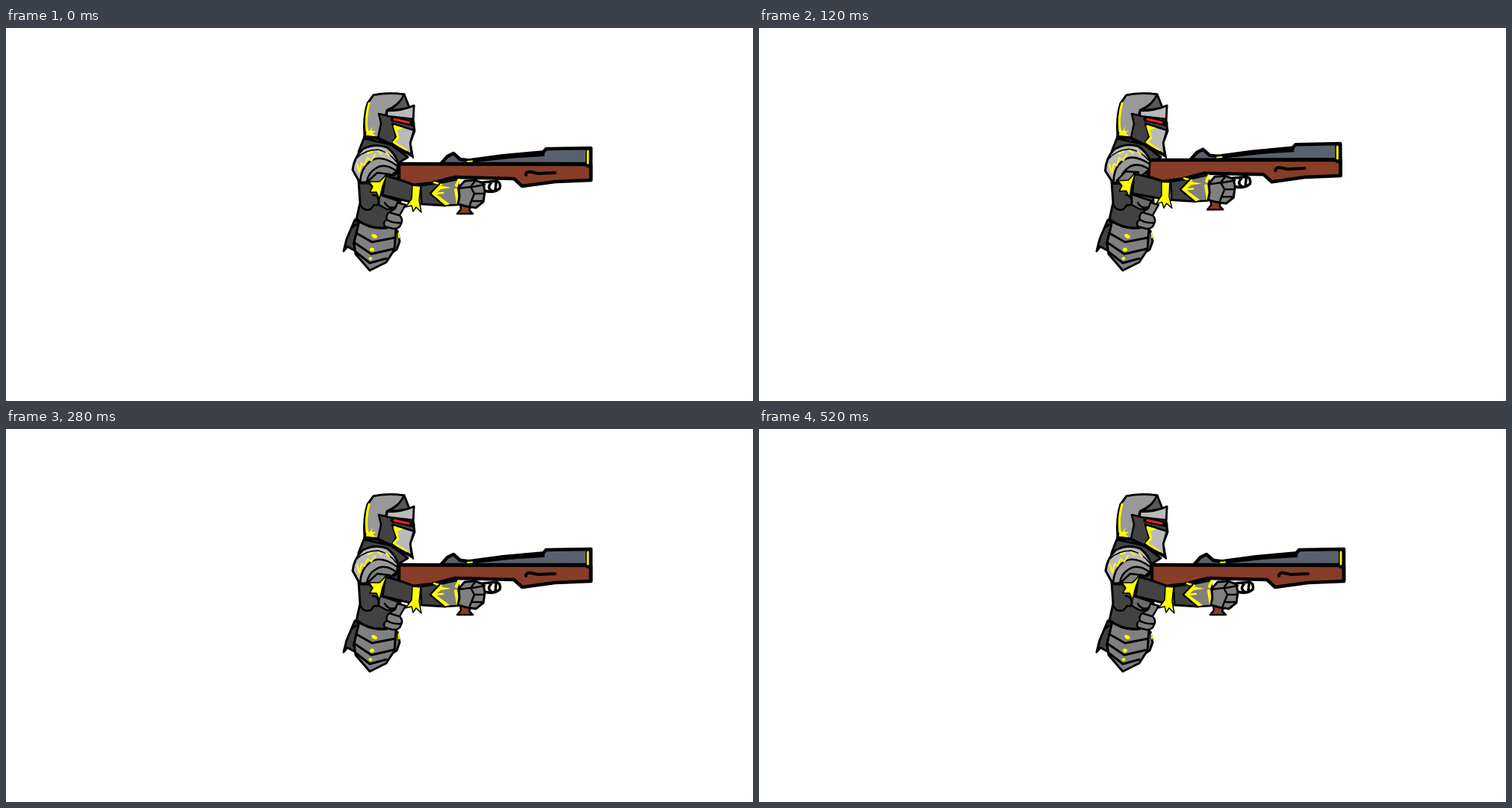
Recreate the animation shown at these times as an HTML page with a canvas. Size 1000 by 500 pixels, loop 1.04 s.

```html
<!DOCTYPE html>
<html lang="en">
<head>
<meta charset="utf-8">
<title>Knight with rifle</title>
<style>
html, body { margin: 0; width: 100%; height: 100%; overflow: hidden; background: #fff; }
canvas { display: block; }
</style>
</head>
<body>
<canvas id="stage" width="1000" height="500"></canvas>
<script>
const ctx = document.getElementById('stage').getContext('2d');
const LOOP = 1040, STEP = 40;
const DARK = '#424242', MID = '#6c6c6c', GREY = '#808080', STEEL = '#999999',
      LIGHT = '#bababa', GOLD = '#ffff00', WOOD = '#873d27', SLATE = '#59616d';

// Recoil amount for each step; it rests for the remainder of the loop.
const kick = [0, 0.25, 0.48, 0.84, 0.97, 1, 0.5];

function shape(d, fill, width = 3) {
  const p = new Path2D(d);
  ctx.fillStyle = fill;
  ctx.fill(p);
  if (width) {
    ctx.strokeStyle = '#000';
    ctx.lineWidth = width;
    ctx.stroke(p);
  }
}

function line(d, width = 3, color = '#000') {
  ctx.strokeStyle = color;
  ctx.lineWidth = width;
  ctx.stroke(new Path2D(d));
}

function dot(x, y, rx, ry, turn) {
  ctx.fillStyle = GOLD;
  ctx.beginPath();
  ctx.ellipse(x, y, rx, ry, turn, 0, Math.PI * 2);
  ctx.fill();
}

// Draws a part shifted by (dx, dy) and turned about (px, py).
function part(draw, dx, dy, turn, px, py) {
  ctx.save();
  ctx.translate(px + dx, py + dy);
  ctx.rotate(turn);
  ctx.translate(-px, -py);
  draw();
  ctx.restore();
}

function skirt() {
  shape('M467 257 L456 283 L452 299 L457 293 L466 298 L474 262Z', DARK);
  shape('M518 270 L524 272 L527 286 L523 297 L515 302Z', MID);
  line('M525.5 275 L526 281', 2, GOLD);
  shape('M473 258 L522 269 L520 297 L509 314 L487 325 L468 303 L466 288Z', GREY);
  line('M469 275 L490 287 L521 281 M467 288 L489 303 L519 296 M468 300 L487 315 L509 309');
  line('M463 268 L469 263 M472 262 L465 290', 2.5);
  dot(493, 279, 4, 2.5, 0.5);
  dot(490, 297, 3, 2.5, 0.2);
  dot(488, 309, 2.5, 2, 0);
}

function torso() {
  shape('M479 148 L472 166 L472 205 L474 234 L469 257 Q488 270 510 268 L528 240 L527 180 L538 173 L515 156Z', DARK);
  shape('M499 223 L526 232 L527 242 L510 243 L499 237Z', MID, 2.5);
  line('M474 236 Q478 246 488 243 L493 237 Q500 239 499 231 Q497 223 491 224', 2.5);
  line('M507 234 Q512 243 521 240', 2.5);
  shape('M513 247 Q508 251 510 257 Q504 260 507 266 L518 269 Q527 270 529 262 Q532 257 527 251 L535 237 L524 234 L521 242Z', GREY, 2.5);
  line('M513 247 L526 251 M510 257 Q518 262 529 261', 2.5);
  line('M469 256 Q487 270 505 268');
}

function helmet() {
  shape('M492 90 Q511 86 533 89 L540 107 L546 104 L545 123 L547 138 L541 154 L544 172 L518 157 L498 147 L480 145 Q478 119 484 101Z', DARK);
  shape('M492 90 Q512 86 533 89 Q528 102 510 110 L508 117 L499 115 L502 128 L498 147 L481 144 Q478 117 485 100Z', STEEL, 2.5);
  shape('M533 89 Q526 104 511 111 L540 107Z', '#585858', 2.5);
  line('M486 101 Q481 118 483 138', 3, GOLD);
  shape('M482 144 L484 134 L486 139 L491 132 L489 138 L495 138 L491 141 L495 145Z', GOLD, 0);
  shape('M510 111 Q531 111 546 104 L545 122 L510 118Z', LIGHT, 2.5);
  line('M518 122 L544 128', 7);
  line('M520 122.5 L539 126.5', 3, '#f02030');
  shape('M517 128 L546 137 L541 154 L543 170 L517 154 L522 145Z', LIGHT, 2.5);
  line('M520 132 L525 147 L519 153 L536 164', 3, GOLD);
  shape('M519 130 L532 134 L524 137 L527 143Z', GOLD, 0);
  line('M480 146 L497 148 L517 157 L542 170', 4);
  line('M541 153 L545 174', 2);
}

function pauldron() {
  shape('M464 190 Q466 173 478 162 Q494 154 510 160 Q521 168 525 181 L520 197 L497 195 L487 208 L474 208Z', LIGHT);
  line('M470 174 Q481 163 498 163 Q513 166 523 180', 1.5);
  shape('M474 207 Q475 188 487 179 Q502 168 524 185 L523 195 L504 195 L488 206Z', STEEL, 2.5);
  shape('M483 206 Q485 194 495 188 Q507 180 523 192 L512 200 L494 202Z', GREY, 2.5);
  line('M470 182 L473 193 L476 181 L480 184 L484 174 L489 178 L494 170', 2, GOLD);
  line('M484 168 L490 166 M498 165 L503 169 M509 167 L513 171', 2, GOLD);
}

function upperArm() {
  shape('M484 206 L497 194 L514 196 L510 205 L493 215Z', GREY, 2.5);
  shape('M508 198 Q528 203 550 212 L545 234 L504 224Z', DARK);
  shape('M510 196 L504 212 L500 229 L496 220 L487 220 L491 213 L486 206 L500 206Z', GOLD, 1.5);
  shape('M544 211 L555 212 L553 231 L556 247 L549 240 L545 246 L543 238 L535 240 L543 229Z', GOLD, 1.5);
}

function rifle() {
  shape('M526 182 L783 183 L783 204 L735 206 L691 212 L680 202 L601 200 L570 208 L545 211 L526 205Z', WOOD, 4.5);
  shape('M582 182 L591 172 L599 168 L608 176 L625 178 L718 168 L723 162 L782 161 L782 182Z', SLATE, 4.5);
  shape('M613 177 L665 170 L720 165 L720 171 L670 174 L625 179Z', '#000', 2);
  line('M526 182 L783 183', 4);
  line('M779 163 L779 184', 6);
  line('M779 165 L779 181', 3, GOLD);
  line('M618 179 L624 178.5', 2, GOLD);
  line('M696 197 Q696 192 703 193 L712 195 L735 194', 4);
  line('M783 161 L783 204', 4.5);
}

function forearm() {
  shape('M608 236 L622 240 L620 244 L625 249 L604 249 L609 243Z', WOOD, 2.5);
  line('M638 207 L657 205 Q663 208 661 215 Q652 222 641 218 M650 207 Q643 214 650 218 M656 208 L655 217', 3.5);
  shape('M555 211 L577 208 L588 238 L556 236Z', DARK);
  shape('M568 222 L581 208 L604 203 L608 217 L605 237 L587 238Z', GREY, 2.5);
  shape('M568 222 L580 211 L596 214 L582 216 L575 222 L594 236 L587 238Z', GOLD, 0);
  line('M574 222 L585 221 M573 207 L583 210', 2.5, GOLD);
  line('M581 208 L568 222 L587 238', 2);
  line('M606 204 L603 211 M602 217 L605 235', 4, GOLD);
  shape('M606 214 L614 205 L628 204 L639 208 L641 219 L639 233 L629 241 L616 239 L605 236 L607 226Z', GREY);
  line('M606 215 L622 213 L628 205 M622 213 L627 222 L621 237 M625 213 L641 210 M628 222 L641 222 M625 232 L639 232', 2.5);
}

function render(time) {
  const k = kick[Math.floor((time % LOOP) / STEP)] || 0;
  ctx.fillStyle = '#fff';
  ctx.fillRect(0, 0, 1000, 500);
  ctx.lineJoin = ctx.lineCap = 'round';
  skirt();
  torso();
  helmet();
  part(rifle, -5.5 * k, -6 * k, -0.005 * k, 526, 190);
  part(pauldron, -1.5 * k, 0, -0.08 * k, 485, 180);
  part(forearm, -4.5 * k, -6.5 * k, -0.005 * k, 570, 222);
  part(upperArm, -6 * k, -3 * k, -0.07 * k, 508, 212);
}

const start = performance.now();
function tick() {
  render(performance.now() - start);
  requestAnimationFrame(tick);
}
tick();
</script>
</body>
</html>
```
